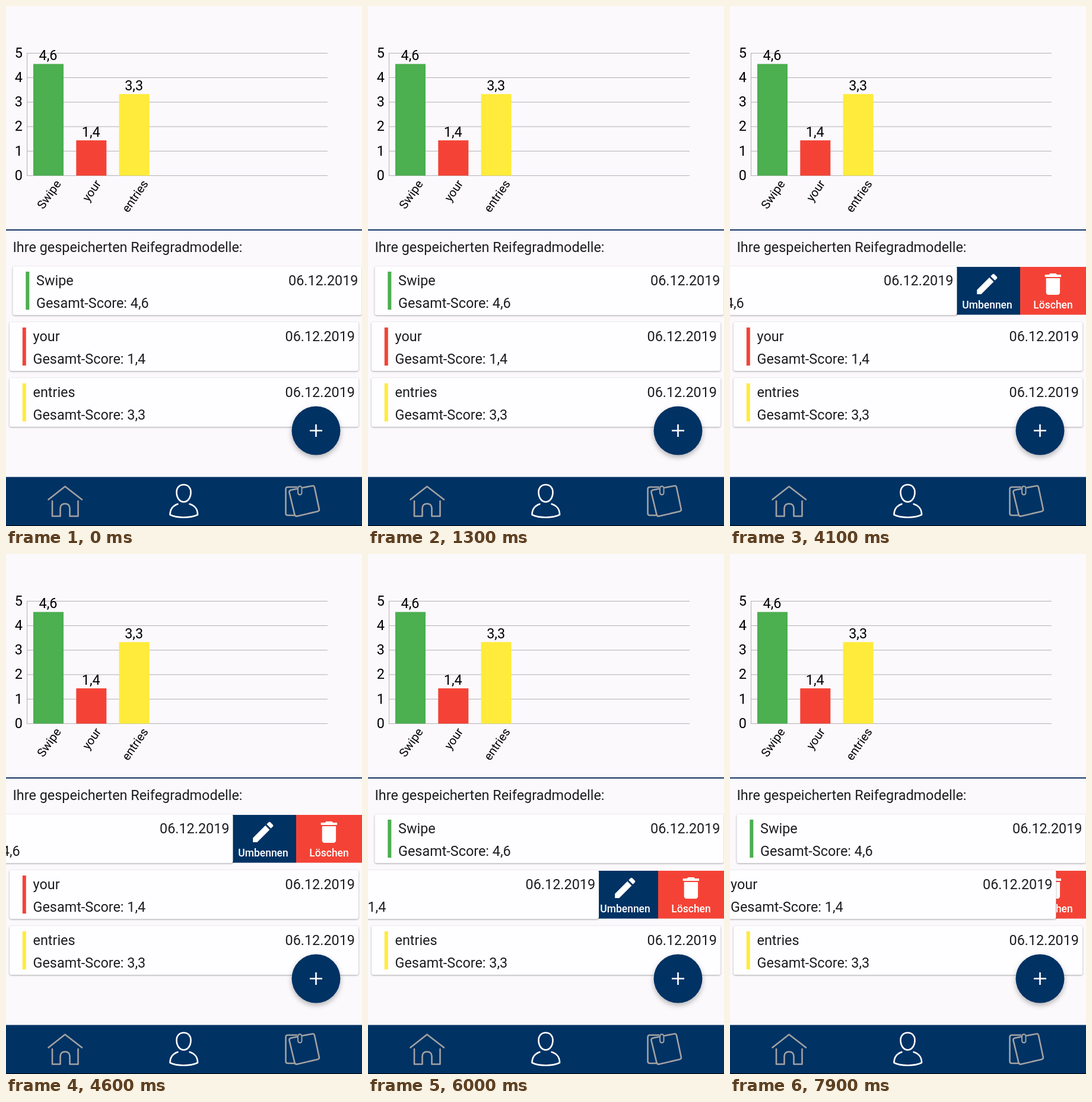
An HTML page for the animation above (8 s loop, 600 by 875 pixels).

```html
<!DOCTYPE html>
<html lang="de">
<head>
<meta charset="utf-8">
<style>
  html, body { margin: 0; width: 100%; height: 100%; overflow: hidden; background: #fbf9fc; }
  svg { display: block; width: 600px; height: 875px; }
  text { font: 23.4px Roboto, sans-serif; fill: #1d1d1f; }
  .chart text { fill: #000; }
  .chart .tilted { font-size: 20px; }
  .end { text-anchor: end; }
  .mid { text-anchor: middle; }
  .action { font: 500 17.5px Roboto, sans-serif; fill: #fff; text-anchor: middle; }
  .card { fill: #fefdff; filter: drop-shadow(0 1.5px 1.5px rgba(0, 0, 0, .34)); }
  .fab { fill: #003264; filter: drop-shadow(0 4px 4px rgba(0, 0, 0, .28)); }
  .icon { fill: none; stroke: #a2a2a2; stroke-width: 2.6; stroke-linejoin: round; stroke-linecap: round; }
</style>
</head>
<body>
<svg viewBox="0 0 600 875">
  <rect width="600" height="875" fill="#fbf9fc"/>
  <g class="chart" id="chart"></g>
  <rect y="375.8" width="600" height="2" fill="#0b2d5e"/>
  <text x="11.5" y="414">Ihre gespeicherten Reifegradmodelle:</text>
  <g id="rows"></g>

  <circle class="fab" cx="522.5" cy="714.5" r="41"/>
  <path d="M512 714.5h21M522.5 704v21" stroke="#fff" stroke-width="2.6"/>

  <rect y="792.5" width="600" height="81.5" fill="#003264"/>
  <rect y="874" width="600" height="1" fill="#000"/>
  <g class="icon">
    <path d="M71.5 830.5L99.5 808.5L128 830.5M78 833V858.5H91.5V845Q92 837.5 99.5 837.5Q107 837.5 107.5 845V858.5H121.5V833"/>
    <g stroke="#fff">
      <path d="M299.5 805.5C307 805.5 311.5 811 311.5 818C311.5 827 306.500 834.500 299.500 834.500C292.500 834.500 287.500 827 287.500 818C287.500 811 292 805.500 299.500 805.500Z"/>
      <path d="M289.500 838C281 841 276.500 846 276.500 856Q285 860.500 299.500 860.500Q314 860.500 323 856C323 846 318.500 841 309.500 838"/>
    </g>
    <path d="M490 809.500H475Q471.500 809.500 471.500 813V853.500Q471.500 857 475 857H486"/>
    <path d="M490 812.500L480 814.500Q477 815.500 477.500 818.500L486.500 856Q487.500 859 490.500 858.500L525 850.500Q528.500 849.500 527.800 846.500L520 810Q519 806.500 516 807.500L500 810.500"/>
    <path d="M492 812V819Q492.500 822.500 495.500 822.500Q498.500 822 498.500 819V811Q498 808 495 808Q492 808.500 492 812" stroke-width="2"/>
  </g>
</svg>
<script>
const GREEN = '#4caf50', RED = '#f44336', YELLOW = '#ffeb3b', NAVY = '#003264';
const PENCIL = 'M3 17.25V21h3.75L17.81 9.94l-3.75-3.75L3 17.25zM20.71 7.04c.39-.39.39-1.02 0-1.41l-2.34-2.34c-.39-.39-1.02-.39-1.41 0l-1.83 1.83 3.75 3.75 1.83-1.83z';
const BIN = 'M6 19c0 1.1.9 2 2 2h8c1.1 0 2-.9 2-2V7H6v12zM19 4h-3.5l-1-1h-5l-1 1H5v2h14V4z';
const entries = [
  { name: 'Swipe', score: '4,6', value: 4.56, color: GREEN, labelEnd: 93.5 },
  { name: 'your', score: '1,4', value: 1.44, color: RED, labelEnd: 161 },
  { name: 'entries', score: '3,3', value: 3.33, color: YELLOW, labelEnd: 240.5 },
];

function chartMarkup() {
  const base = 285.4, unit = 41.2;
  let out = '';
  for (let i = 0; i <= 5; i++) {
    const y = base - i * unit;
    out += `<path d="M35 ${y}H542" stroke="#b0afb1"/><text class="end" x="28" y="${y + 7.4}">${i}</text>`;
  }
  out += `<path d="M35.5 79V286" stroke="#b0afb1"/>`;
  entries.forEach((e, i) => {
    const x = 46 + i * 72.3, height = e.value * unit;
    out += `<rect x="${x}" y="${base - height}" width="51" height="${height}" fill="${e.color}"/>
      <text class="mid" x="${x + 25}" y="${base - height - 6.2}">${e.score}</text>
      <text class="tilted end" transform="translate(${e.labelEnd} 299) rotate(-55)">${e.name}</text>`;
  });
  return out;
}

function rowMarkup(e, i) {
  return `<g transform="translate(0 ${438 + 94 * i})">
    <g id="actions${i}">
      <rect x="378" y="1" width="111" height="80.5" fill="${NAVY}"/>
      <rect x="489" y="1" width="111" height="80.5" fill="${RED}"/>
      <path d="${PENCIL}" transform="translate(410.500 7) scale(1.9)" fill="#fff"/>
      <path d="${BIN}" transform="translate(521 6) scale(1.95 2)" fill="#fff"/>
      <text class="action" x="433.5" y="71">Umbennen</text>
      <text class="action" x="544.5" y="71">Löschen</text>
    </g>
    <g id="card${i}">
      <rect class="card" x="6" width="588" height="82" rx="3"/>
      <rect x="27.800" y="9" width="6" height="64" fill="${e.color}"/>
      <text x="45.5" y="31.5">${e.name}</text>
      <text x="45.5" y="69.500">Gesamt-Score: ${e.score}</text>
      <text class="end" x="588" y="31.5">06.12.2019</text>
    </g>
  </g>`;
}

const byId = id => document.getElementById(id);
byId('chart').innerHTML = chartMarkup();
byId('rows').innerHTML = entries.map(rowMarkup).join('');

const progress = (t, from, to) => Math.min(1, Math.max(0, (t - from) / (to - from)));
const easeInOut = p => p < .5 ? 2 * p * p : 1 - 2 * (1 - p) ** 2;

// Openness of a row: dragged open, then released with a damped spring.
function openness(t, dragStart, dragEnd, release) {
  if (t < release) return easeInOut(progress(t, dragStart, dragEnd));
  const s = (t - release) / 1000;
  if (s > .23) return 0;
  return Math.max(0, Math.exp(-11 * s) * (Math.cos(10.44 * s) + 1.054 * Math.sin(10.44 * s)));
}

// Opacity of a tapped card: dims on touch, recovers after release.
const tapOpacity = (t, touch, release) => t < release
  ? 1 - .8 * easeInOut(progress(t, touch, touch + 150))
  : .2 + .8 * easeInOut(progress(t, release, release + 250));

function place(i, x, opacity, showActions) {
  byId('card' + i).setAttribute('transform', `translate(${x} 0)`);
  byId('card' + i).setAttribute('opacity', opacity);
  byId('actions' + i).setAttribute('visibility', showActions ? 'visible' : 'hidden');
}

function render(t) {
  const first = t < 3100 ? openness(t, 1950, 2350, 2658) : openness(t, 3150, 3600, 4660);
  place(0, 5.5 - 217 * first, 1, first > 0);

  const touched = t >= 5700;
  const second = openness(t, 5650, 6050, 6260);
  const pull = 43.5 * progress(t, 7700, 7900) ** 2;
  const opacity = t < 4000 ? tapOpacity(t, 2540, 2658) : tapOpacity(t, 6140, 6260);
  place(1, touched ? -1 - 210.5 * second - pull : 0, opacity, touched);

  place(2, 0, 1, false);
}

const start = performance.now();
function tick() {
  const t = (performance.now() - start) % 8000;
  render(Math.floor(t / 100) * 100);
  requestAnimationFrame(tick);
}
tick();
</script>
</body>
</html>
```
